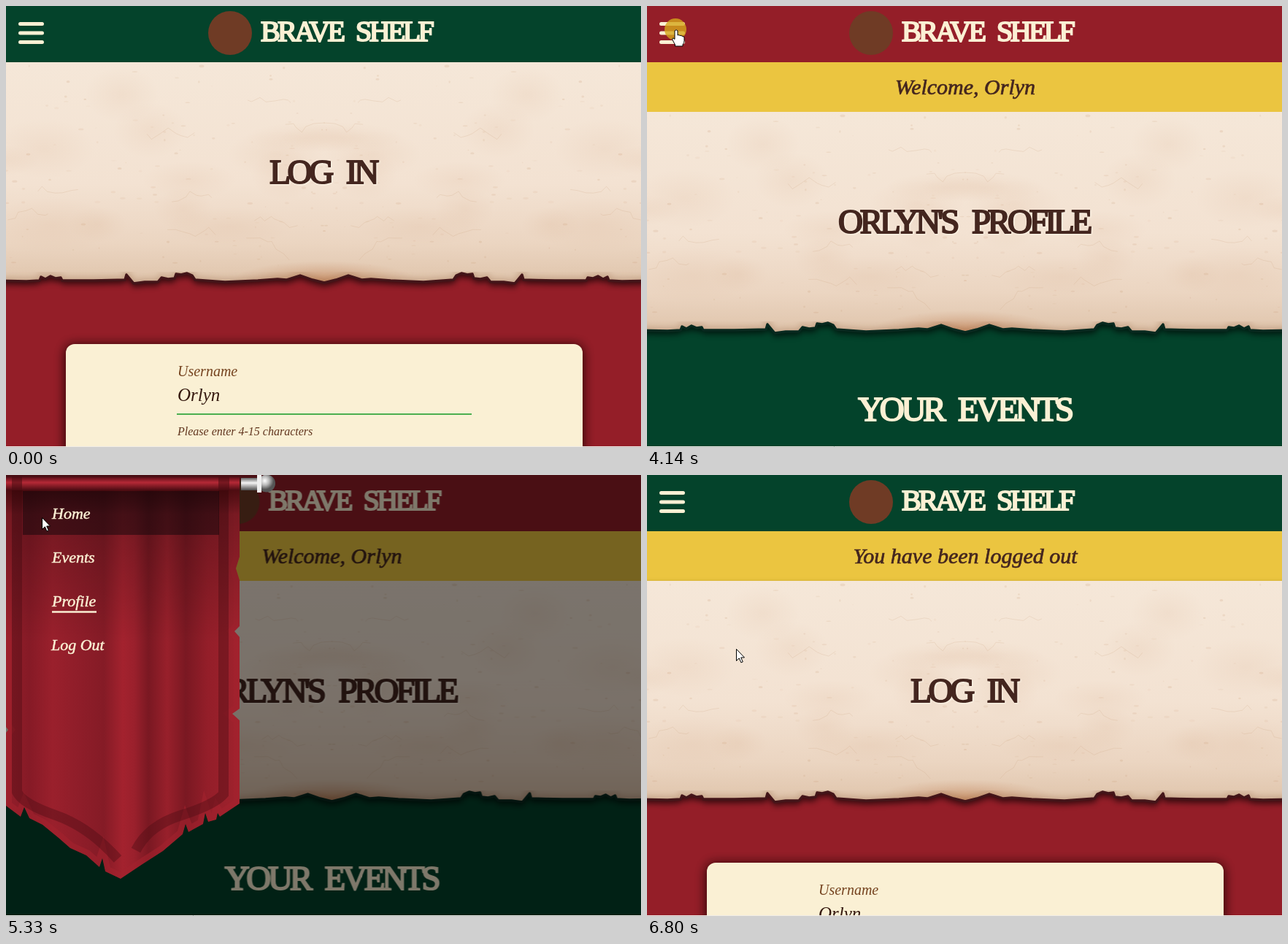
Animation, 870 px wide and 604 px high, one loop 7.86 s. Source, as an HTML page:

```html
<!DOCTYPE html>
<html lang="en">
<head>
<meta charset="utf-8">
<title>Log in and out</title>
<style>
  html, body { margin: 0; width: 100%; height: 100%; overflow: hidden; background: #941e28; }
  svg { display: block; width: 870px; height: 604px; }
  .caps { font: 47px "Liberation Serif", serif; letter-spacing: -.09em; word-spacing: .28em;
          stroke: currentColor; stroke-width: 2.2px; fill: currentColor; }
  .brand { font-size: 40px; }
  .dark { color: #44261f; filter: drop-shadow(1px 1px 1px #fff8ea); }
  .light { color: #fbf0d4; }
  .mid { text-anchor: middle; }
  .script { font: italic 30px "Liberation Serif", serif; fill: #44261f; }
  .notice { stroke: #44261f; stroke-width: .7px; }
  .links { font-size: 22px; fill: #fbf0d4; stroke: #fbf0d4; stroke-width: .5px; }
  .label { font-size: 20px; fill: #75431f; }
  .value { font-size: 25px; fill: #35190f; }
  .hint { font-size: 16px; fill: #62361f; }
</style>
</head>
<body>
<svg viewBox="0 0 870 604" xmlns="http://www.w3.org/2000/svg">
  <defs>
    <linearGradient id="sheet" x2="0" y2="1">
      <stop stop-color="#f5e7d8"/><stop offset=".55" stop-color="#f3e2d2"/>
      <stop offset=".82" stop-color="#ebd5c1"/><stop offset="1" stop-color="#dfc4ab"/>
    </linearGradient>
    <radialGradient id="burn">
      <stop stop-color="#c07b4c" stop-opacity=".65"/><stop offset="1" stop-color="#c99572" stop-opacity="0"/>
    </radialGradient>
    <radialGradient id="stain">
      <stop stop-color="#cf9f7b" stop-opacity=".11"/><stop offset="1" stop-color="#cf9f7b" stop-opacity="0"/>
    </radialGradient>
    <linearGradient id="folds" gradientUnits="userSpaceOnUse" x2="320">
      <stop stop-color="#941e2a"/><stop offset=".1" stop-color="#861a26"/>
      <stop offset=".2" stop-color="#9a202c"/><stop offset=".32" stop-color="#8e1d29"/>
      <stop offset=".42" stop-color="#851b26"/><stop offset=".5" stop-color="#a3222e"/>
      <stop offset=".55" stop-color="#9a202c"/><stop offset=".61" stop-color="#7a1822"/>
      <stop offset=".69" stop-color="#98202b"/><stop offset=".77" stop-color="#7a1822"/>
      <stop offset=".86" stop-color="#931e29"/><stop offset="1" stop-color="#a0222d"/>
    </linearGradient>
    <linearGradient id="shade" gradientUnits="userSpaceOnUse" y1="20" x2="0" y2="230">
      <stop stop-color="#200" stop-opacity=".65"/><stop offset=".16" stop-opacity=".25"/>
      <stop offset="1" stop-opacity="0"/>
    </linearGradient>
    <linearGradient id="rod" x2="0" y2="1">
      <stop stop-color="#5c0f18"/><stop offset=".4" stop-color="#b52936"/><stop offset="1" stop-color="#4a0b12"/>
    </linearGradient>
    <linearGradient id="steel" x2="0" y2="1">
      <stop stop-color="#666"/><stop offset=".4" stop-color="#f4f4f4"/><stop offset="1" stop-color="#4c4c4c"/>
    </linearGradient>
    <radialGradient id="ball" cx=".4" cy=".35">
      <stop stop-color="#fff"/><stop offset=".5" stop-color="#b9b9b9"/><stop offset="1" stop-color="#555"/>
    </radialGradient>
    <filter id="soft" x="-10%" y="-10%" width="120%" height="120%"><feGaussianBlur stdDeviation="4"/></filter>
    <filter id="hazy" x="-10%" y="-10%" width="120%" height="120%"><feGaussianBlur stdDeviation=".7"/></filter>
    <filter id="halo" x="-10%" y="-10%" width="120%" height="130%"><feGaussianBlur stdDeviation="7"/></filter>
    <clipPath id="sheetClip"><path class="sheet"/></clipPath>
    <clipPath id="drapeClip"><path class="drape"/></clipPath>
    <g id="wear"></g>
    <g id="paper">
      <path class="sheet" transform="translate(0 5)" filter="url(#soft)" opacity=".65"/>
      <path class="sheet" fill="url(#sheet)"/>
      <g clip-path="url(#sheetClip)">
        <use href="#wear"/><use href="#wear" transform="matrix(-1 0 0 1 872 0)"/>
        <ellipse cx="436" cy="376" rx="125" ry="27" fill="url(#burn)"/>
        <path class="edge" fill="none" stroke="#8a5636" stroke-width="9" opacity=".3" filter="url(#soft)"/>
      </g>
      <path class="edge" fill="none" stroke="currentColor" stroke-width="3.4" stroke-linejoin="round" filter="url(#hazy)"/>
    </g>
    <g id="topbar" class="light">
      <path d="M19.5 24.5h30M19.5 37h30M19.5 49.5h30" stroke="currentColor" stroke-width="5" stroke-linecap="round"/>
      <circle cx="307" cy="37" r="30" fill="#6f3b25"/>
      <text class="caps brand" x="349" y="48">BRAVE SHELF</text>
    </g>
    <path id="strip" d="M-20 77H900V145H-20z" fill="#ebc540"/>
  </defs>

  <g id="login">
    <path d="M-20 0H900V604H-20z" fill="#941e28"/>
    <use href="#strip"/>
    <text class="script notice mid" x="436" y="121">You have been logged out</text>
    <g id="form">
      <path d="M-20 145H900V604H-20z" fill="#941e28"/>
      <use href="#paper" color="#431519"/>
      <text class="caps dark mid" x="434" y="243">LOG IN</text>
      <rect x="80" y="463" width="712" height="220" rx="14" fill="#1c0306" opacity=".8" filter="url(#halo)"/>
      <rect x="82" y="463" width="708" height="220" rx="12" fill="#faf0d4"/>
      <text class="script label" x="235" y="507">Username</text>
      <text class="script value" x="235" y="541">Orlyn</text>
      <text class="script hint" x="235" y="588">Please enter 4-15 characters</text>
      <path d="M234 559H638" stroke="#4caf50" stroke-width="2"/>
    </g>
    <path d="M-20 0H900V77H-20z" fill="#04432b"/>
    <use href="#topbar"/>
  </g>

  <g id="profile">
    <path d="M-20 0H900V604H-20z" fill="#03432b"/>
    <use href="#paper" color="#08291f" y="68"/>
    <path d="M-20 0H900V77H-20z" fill="#941e28"/>
    <use href="#strip"/>
    <use href="#topbar"/>
    <text class="script notice mid" x="436" y="121">Welcome, Orlyn</text>
    <text class="caps dark mid" x="434" y="311">ORLYN'S PROFILE</text>
    <text class="caps light mid" x="435" y="568">YOUR EVENTS</text>
  </g>

  <path id="dim" d="M0 0H870V604H0z"/>

  <g id="menu">
    <g clip-path="url(#drapeClip)">
      <path class="drape" fill="url(#folds)"/>
      <path class="drape" fill="none" stroke="#a3222e" stroke-width="16" opacity=".6"/>
      <path d="M15 20V434Q22 450 68 466T153 526M298 20V437Q285 452 240 466T178 514"
            fill="none" stroke="#4d0c15" stroke-width="14" opacity=".42"/>
      <path class="drape" fill="url(#shade)"/>
    </g>
    <path d="M0 3H320V21H0z" fill="url(#rod)"/>
    <path d="M8 2H22V21H8zM291 2H306V21H291z" fill="#4a0b12" opacity=".55"/>
    <path d="M322 4H346V21H322z" fill="url(#steel)"/>
    <circle cx="357" cy="11.5" r="12" fill="url(#ball)"/>
    <path d="M344 0h6v24h-6z" fill="#eee"/>
    <path id="hover" d="M23 22H292V82H23z" fill="#10060a" fill-opacity=".5"/>
    <g class="script links">
      <text x="63" y="60">Home</text>
      <text x="63" y="120">Events</text>
      <text x="63" y="180">Profile</text>
      <text x="62" y="240">Log Out</text>
    </g>
    <path d="M63 187.5H124" stroke="#fbf0d4" stroke-width="2.5"/>
  </g>

  <g id="pointer">
    <circle id="click" r="15" cx="-1" fill="#d5a71b"/>
    <path id="arrow" d="M.5 .5V16.5l3.8-3.6 2.6 6 2.4-1-2.6-5.9h4.8z" fill="#fff" stroke="#000"/>
    <path id="hand" d="M-2 2Q0-.8 2 2V8q2-1 3.2.6 2-.8 3 .8 2.8-.6 2.8 2.4v4q0 3-2 5V23H-1.5V21L-5 14.5q-1-2.4 1-2.6L-2 13.5Z"
          fill="#fff" stroke="#000"/>
  </g>
  <path d="M0 603.5H870" stroke="#eeeae6"/>
</svg>

<script>
const LOOP = 7860;
const $ = id => document.getElementById(id);
const setPath = (name, d) => document.querySelectorAll('.' + name).forEach(p => p.setAttribute('d', d));

// Torn sheet: left half of the edge, mirrored at x = 436.
const half = [[-20, 376], [28, 377], [46, 376], [48, 371], [54, 374], [61, 370], [68, 373], [75, 372], [77, 376],
  [120, 376], [163, 375], [165, 368], [170, 374], [175, 380], [190, 378], [208, 378], [213, 372], [222, 374],
  [231, 373], [233, 367], [240, 368], [248, 366], [255, 369], [259, 375], [300, 378], [345, 376], [372, 374],
  [384, 375], [403, 369], [420, 375], [436, 379]];
const edge = [...half, ...half.slice(0, -1).reverse().map(([x, y]) => [872 - x, y])].join('L');
setPath('edge', 'M' + edge);
setPath('sheet', `M-20 77L${edge}L892 77z`);

setPath('drape', 'M0 10H320V112L315 128 320 144V207L313 214 320 222V320L310 327 320 336V450L293 468 290 463 ' +
  '288 472 277 475 273 463 270 478 250 489 246 478 242 492 215 515 187 533 157 553 136 543 132 525 128 537 ' +
  '110 521 88 511 72 497 50 479 32 470 25 455 20 468 0 453V353L3 349 0 345z');

// Stains, specks and cracks on half of the sheet.
let seed = 11;
const rnd = (a, b) => a + (b - a) * ((seed = seed * 16807 % 2147483647) / 2147483647);
let wear = '';
for (let i = 0; i < 12; i++)
  wear += `<ellipse cx="${rnd(-10, 430)}" cy="${rnd(100, 350)}" rx="${rnd(40, 90)}" ry="${rnd(20, 45)}" fill="url(#stain)"/>`;
for (let i = 0; i < 110; i++)
  wear += `<ellipse cx="${rnd(0, 436)}" cy="${rnd(80, 365)}" rx="${rnd(.6, 4)}" ry="${rnd(.5, 1.8)}" fill="#c4956f" opacity="${rnd(.06, .2)}"/>`;
for (let i = 0; i < 9; i++) {
  let d = `M${rnd(0, 400)} ${rnd(90, 330)}`;
  for (let k = 0; k < 7; k++) d += `l${rnd(3, 14)} ${rnd(-9, 11)}`;
  wear += `<path d="${d}" fill="none" stroke="#c4956f" opacity=".18"/>`;
}
$('wear').innerHTML = wear;

// Keyframes written in milliseconds; every value holds until the next one.
let css = '';
function track(id, ...keys) {
  const rows = [...keys, [LOOP, keys.at(-1)[1]]].map(([ms, rule]) => `${ms / LOOP * 100}%{${rule}}`);
  css += `@keyframes ${id}{${rows.join('')}}#${id}{animation:${id} ${LOOP}ms step-end infinite}`;
}
const move = (x, y) => `transform:translate(${x}px,${y}px)`;
const fade = (...keys) => keys.map(([ms, value]) => [ms, `opacity:${value}`]);

// Stepped travel along a quadratic curve from a to b with eased ends.
function travel(start, end, count, a, c, b) {
  return Array.from({ length: count }, (_, i) => {
    const p = (i + 1) / count, s = p * p * (3 - 2 * p);
    const at = k => (1 - s) ** 2 * a[k] + 2 * s * (1 - s) * c[k] + s * s * b[k];
    return { ms: start + (end - start) * i / (count - 1), x: at(0), y: at(1) };
  });
}
const toKeys = points => points.map(p => [p.ms, move(p.x, p.y)]);
const rise = travel(2880, 3620, 12, [-6, 455], [18, 150], [40, 32]);
const descend = travel(5190, 5800, 9, [40, 32], [75, 135], [122, 238]);

track('form', [0, move(0, 0)], [1150, move(0, 68)]);
track('profile', [0, 'opacity:0;' + move(0, 0)], [1150, 'opacity:1;' + move(0, 0)],
  [4430, 'opacity:1;' + move(10.5, 0)], [6800, 'opacity:0;' + move(0, 0)]);

const opening = [[4430, .02], [4490, .3], [4550, .68], [4650, .93], [4720, 1]];
track('menu', [0, move(-425, 0)], ...opening.map(([ms, p]) => [ms, move(-425 * (1 - p), 0)]), [6800, move(-425, 0)]);
track('dim', ...fade([0, 0], ...opening.map(([ms, p]) => [ms, p / 2]), [6800, 0]));

const row = y => Math.floor((y - 22) / 60) * 60;
track('hover', [0, 'opacity:0'], ...descend.map(p => [p.ms, 'opacity:1;' + move(0, row(p.y))]),
  [6490, 'opacity:.7;' + move(0, 180)], [6565, 'opacity:.35;' + move(0, 180)], [6640, 'opacity:0']);

track('pointer', [0, move(-40, 504)], [2410, move(27, 504)], [2480, move(5, 472)], [2540, move(-8, 457)],
  ...toKeys(rise), ...toKeys(descend));
track('hand', ...fade([0, 0], [3553, 1], [4430, 0], [5940, 1], [6800, 0]));
track('arrow', ...fade([0, 1], [3553, 0], [4430, 1], [5940, 0], [6800, 1]));
track('click', ...fade([0, 0], [4140, .8], [4430, 0], [6210, .8], [6490, 0]));

document.head.append(Object.assign(document.createElement('style'), { textContent: css }));
</script>
</body>
</html>
```
